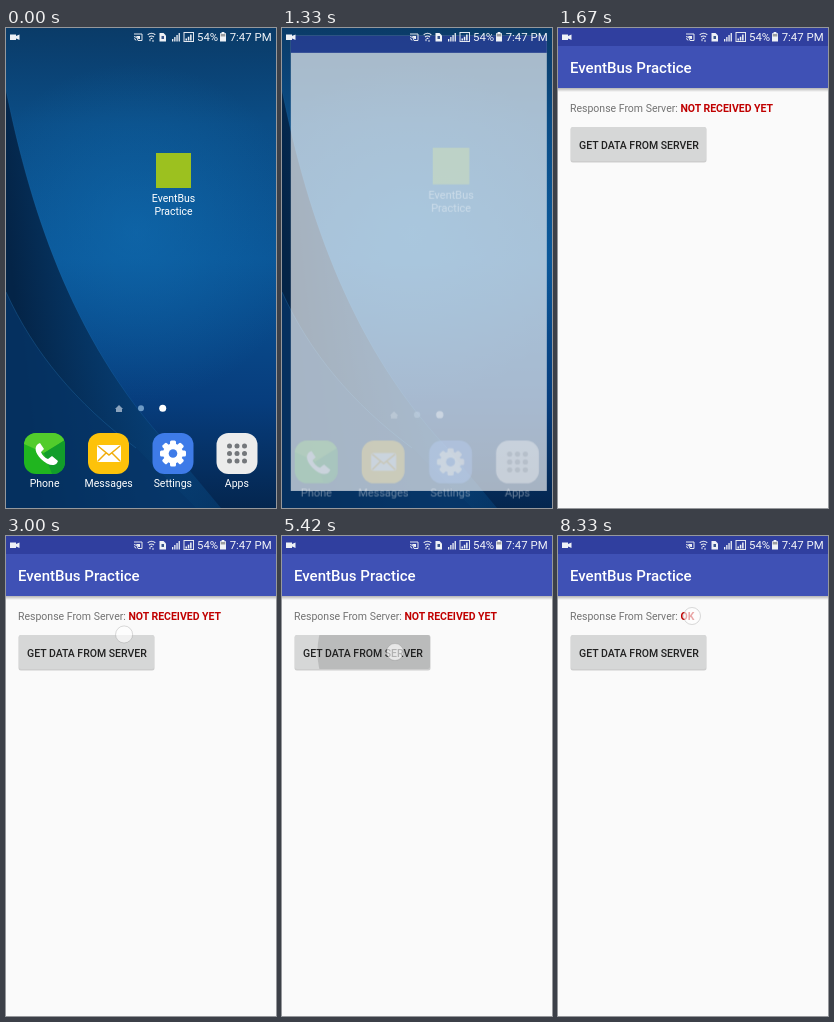
Animation, 270 px wide and 480 px high, one loop 8.41 s. Source, as an HTML page:

```html
<!DOCTYPE html>
<html lang="en">
<head>
<meta charset="utf-8">
<title>EventBus Practice</title>
<style>
  html, body { margin: 0; width: 100%; height: 100%; overflow: hidden; background: #06294f; }
  svg { display: block; width: 100%; height: 100%; }
  text { font-family: Roboto, sans-serif; font-size: 10.5px; }
  .mid { text-anchor: middle; fill: #fff; }
  .medium { font-weight: 500; }
  .bold { font-weight: 700; fill: #c00000; }
  .status { font-size: 11.4px; fill: #f2f4f8; }
</style>
</head>
<body>
<svg viewBox="0 0 270 480" preserveAspectRatio="none">
  <defs>
    <linearGradient id="sky" x2="0" y2="1">
      <stop offset="0" stop-color="#0a3b68"/>
      <stop offset=".2" stop-color="#0b4d86"/>
      <stop offset=".48" stop-color="#0a5596"/>
      <stop offset=".78" stop-color="#073d7d"/>
      <stop offset="1" stop-color="#04264f"/>
    </linearGradient>
    <radialGradient id="glow" gradientUnits="userSpaceOnUse" cx="130" cy="205" r="170">
      <stop offset="0" stop-color="#1170b5" stop-opacity=".55"/>
      <stop offset="1" stop-color="#1170b5" stop-opacity="0"/>
    </radialGradient>
    <linearGradient id="fold" x1="0" y1=".3" x2="1" y2=".1">
      <stop offset="0" stop-color="#042447"/>
      <stop offset=".6" stop-color="#073f74" stop-opacity=".8"/>
      <stop offset="1" stop-color="#084a85" stop-opacity=".25"/>
    </linearGradient>
    <linearGradient id="shade" x2="0" y2="1">
      <stop offset="0" stop-color="#000" stop-opacity=".28"/>
      <stop offset="1" stop-color="#000" stop-opacity="0"/>
    </linearGradient>
    <clipPath id="buttonClip"><rect x="13" y="99" width="135" height="34" rx="2"/></clipPath>
    <clipPath id="phoneClip"><rect x="18" y="405" width="41" height="41" rx="12"/></clipPath>
  </defs>

  <g id="wallpaper">
    <rect width="270" height="480" fill="url(#sky)"/>
    <rect width="270" height="480" fill="url(#glow)"/>
    <path d="M0 62C22 170 62 310 165 420L215 480H0Z" fill="url(#fold)"/>
    <path d="M0 62C22 170 62 310 165 420" fill="none" stroke="#2377b5" stroke-opacity=".22"/>
    <path d="M0 264C28 325 70 375 130 420L190 480H0Z" fill="#063467" fill-opacity=".75"/>
    <path d="M0 264C28 325 70 375 130 420" fill="none" stroke="#2572b0" stroke-opacity=".35"/>
  </g>

  <g id="home">
    <g id="shortcut">
      <rect x="150" y="125" width="35" height="35" fill="#9cc11f"/>
      <text class="mid" x="167.5" y="174">EventBus</text>
      <text class="mid" x="167.5" y="186.5">Practice</text>
    </g>
    <path d="M109 381L113 377L117 381H116V384H110V381Z" fill="#8ba3bd"/>
    <circle cx="135" cy="380.300" r="3" fill="#6d9ac6"/>
    <circle cx="156.700" cy="380.300" r="3.500" fill="#fff"/>
    <g clip-path="url(#phoneClip)">
      <rect x="18" y="405" width="41" height="41" fill="#20b51f"/>
      <path d="M18 405H59V412L38 425L18 416Z" fill="#52cc2c"/>
      <path d="M38 425L59 412V446H46Z" fill="#129d2a"/>
      <path d="M32 416c-4 3-3 9 3 15s13 8 16 4l1-2-6-5-4 3c-3-1-6-4-7-7l3-3-4-6Z" fill="#fff"/>
    </g>
    <rect x="82" y="405" width="41" height="41" rx="12" fill="#fdc20a"/>
    <rect x="91" y="417" width="24" height="17" rx="2" fill="#fff"/>
    <path d="M92 418L103 427L114 418M92 433L100 425M114 433L106 425" fill="none" stroke="#f0ad0a" stroke-width="1.500"/>
    <rect x="146.500" y="405" width="41" height="41" rx="12" fill="#3e7be8"/>
    <g id="gear" fill="#fff"></g>
    <rect x="210.500" y="405" width="41" height="41" rx="12" fill="#ececec"/>
    <g id="grid" fill="#74777b"></g>
    <g id="labels"></g>
  </g>

  <g id="app">
    <rect width="270" height="480" fill="#fafafa"/>
    <rect width="270" height="18" fill="#303f9f"/>
    <g id="content">
      <rect y="60" width="270" height="4" fill="url(#shade)"/>
      <rect y="18" width="270" height="42" fill="#3f51b5"/>
      <text class="medium" x="12" y="45" fill="#fff" style="font-size:15px">EventBus Practice</text>
      <text x="12" y="83.500" fill="#737373" xml:space="preserve">Response From Server: <tspan id="reply" class="bold">NOT RECEIVED YET</tspan></text>
      <rect x="12.500" y="99" width="136" height="35.500" rx="2.500" fill="#000" fill-opacity=".18"/>
      <rect x="13" y="99" width="135" height="34" rx="2" fill="#d6d7d7"/>
      <circle id="ripple" cx="113" cy="116" clip-path="url(#buttonClip)"/>
      <text class="medium" x="21" y="120.500" fill="#212121">GET DATA FROM SERVER</text>
    </g>
  </g>

  <g id="statusbar" fill="#eef1f6">
    <path d="M4 6.500H10V8L13.500 6.500V12L10 10.500V12H4Z"/>
    <path d="M128 6H136V12.500H132M128 8.500A4 4 0 0 1 132 12.500M128 10.700A2 2 0 0 1 130 12.500" fill="none" stroke="#e4e8ef"/>
    <path d="M130 8H134V11H132.500Z"/>
    <path d="M141.700 6.800Q145.500 3.700 149.300 6.800M143 9Q145.500 7 148 9" fill="none" stroke="#e4e8ef" stroke-width="1.200"/>
    <path d="M145.500 9.500L147 11H144ZM143 11.500H145L144 13.500ZM146 13.500H148L147 11.500Z"/>
    <path d="M153.500 5H157.500L160 7.500V13.500H153.500Z"/>
    <path d="M155.500 8H158V11H155.500Z" fill="#39558a"/>
    <path d="M166 11H167.300V13.500H166ZM168.200 9H169.500V13.500H168.200ZM170.400 7H171.700V13.500H170.400ZM172.600 5H173.900V13.500H172.600Z"/>
    <rect x="178" y="4.500" width="9.500" height="9" fill="none" stroke="#e4e8ef"/>
    <path d="M179.500 10.500H181V12.500H179.500ZM181.800 8.700H183.300V12.500H181.800ZM184.100 6.500H185.600V12.500H184.100Z"/>
    <path d="M215.600 4H218.400V5.300H220V13.500H214V5.300H215.600Z"/>
    <path d="M214.700 6H219.300V8.500H214.700Z" fill="#000" fill-opacity=".35"/>
    <text class="status" x="191" y="13.300">54%</text>
    <text class="status" x="223.700" y="13.300">7:47 PM</text>
  </g>

  <circle id="touch" r="8.500" fill="#fff" fill-opacity=".65" stroke="#777" stroke-opacity=".35" stroke-width=".8"/>
</svg>
<script>
  const LOOP = 8410;
  const $ = id => document.getElementById(id);
  const clamp = v => Math.max(0, Math.min(1, v));
  const span = (t, a, b) => clamp((t - a) / (b - a));
  const easeOut = p => 1 - (1 - p) ** 2;
  const set = (id, attrs) => {
    for (const key in attrs) $(id).setAttribute(key, attrs[key]);
  };
  const zoom = (x, y, s) => `translate(${x} ${y}) scale(${s}) translate(${-x} ${-y})`;

  $('labels').innerHTML = ['Phone', 'Messages', 'Settings', 'Apps']
    .map((name, i) => `<text class="mid" x="${38.6 + i * 64.1}" y="459">${name}</text>`).join('');
  $('grid').innerHTML = Array.from({ length: 9 }, (_, i) =>
    `<circle cx="${223.5 + i % 3 * 7.5}" cy="${418 + Math.floor(i / 3) * 7.5}" r="2.5"/>`).join('');
  $('gear').innerHTML = Array.from({ length: 8 }, (_, i) =>
    `<rect x="164" y="412.500" width="6" height="8" rx="1.500" transform="rotate(${i * 45} 167 425.500)"/>`).join('') +
    '<circle cx="167" cy="425.500" r="10"/><circle cx="167" cy="425.500" r="4.300" fill="#3e7be8"/>';

  // Each gesture: start, end, fade length, then [time, x, y] points.
  const gestures = [
    { from: 880, to: 1150, fade: 80, path: [[880, 172, 144]] },
    { from: 2330, to: 4920, fade: 0, path: [
      [2330, 228, 81], [2500, 185, 72], [2670, 128, 70], [2850, 82, 84],
      [3080, 145, 104], [3280, 222, 103], [3430, 255, 90], [3580, 235, 87]] },
    { from: 4920, to: 5700, fade: 150, path: [[4920, 175, 125], [5250, 113, 116]] },
    { from: 7170, to: 8410, fade: 0, path: [
      [7170, 150, 79], [7330, 100, 70], [7500, 44, 82], [7670, 80, 102],
      [7830, 136, 98], [7920, 148, 86], [8040, 134, 80]] }
  ];

  const spline = (a, b, c, d, u) => b + .5 * u * (c - a + u * (2 * a - 5 * b + 4 * c - d + u * (3 * (b - c) + d - a)));

  function along(path, t) {
    const last = path.length - 1;
    const at = i => path[Math.max(0, Math.min(last, i))];
    let i = 0;
    while (i < last && t >= path[i + 1][0]) i++;
    const u = i < last ? span(t, path[i][0], path[i + 1][0]) : 0;
    return [1, 2].map(k => spline(at(i - 1)[k], at(i)[k], at(i + 1)[k], at(i + 2)[k], u));
  }

  function drawTouch(t) {
    const g = gestures.find(g => t >= g.from && t < g.to);
    if (!g) return set('touch', { opacity: 0 });
    const [cx, cy] = along(g.path, t);
    const rest = t > 3700 && t < 4920;
    set('touch', {
      cx, cy,
      opacity: g.fade ? span(t, g.to, g.to - g.fade) : 1,
      'stroke-opacity': rest ? .22 : .35
    });
  }

  function draw(t) {
    const open = easeOut(span(t, 1200, 1550));
    set('shortcut', { opacity: t >= 920 && t < 1120 ? .5 : 1 });
    set('home', {
      opacity: 1 - .95 * open,
      transform: zoom(135, 240, 1 + .075 * open)
    });
    set('app', {
      opacity: clamp(1.08 * open),
      transform: zoom(170, 150, .868 + .132 * open)
    });
    set('content', { opacity: span(t, 1460, 1620) });
    $('reply').textContent = t < 6670 ? 'NOT RECEIVED YET' : 'OK';
    set('ripple', {
      r: 105 * easeOut(span(t, 5250, 5600)),
      opacity: .13 * (1 - span(t, 5500, 5800))
    });
    drawTouch(t);
  }

  const start = performance.now();
  function tick() {
    draw((performance.now() - start) % LOOP);
    requestAnimationFrame(tick);
  }
  tick();
</script>
</body>
</html>
```
